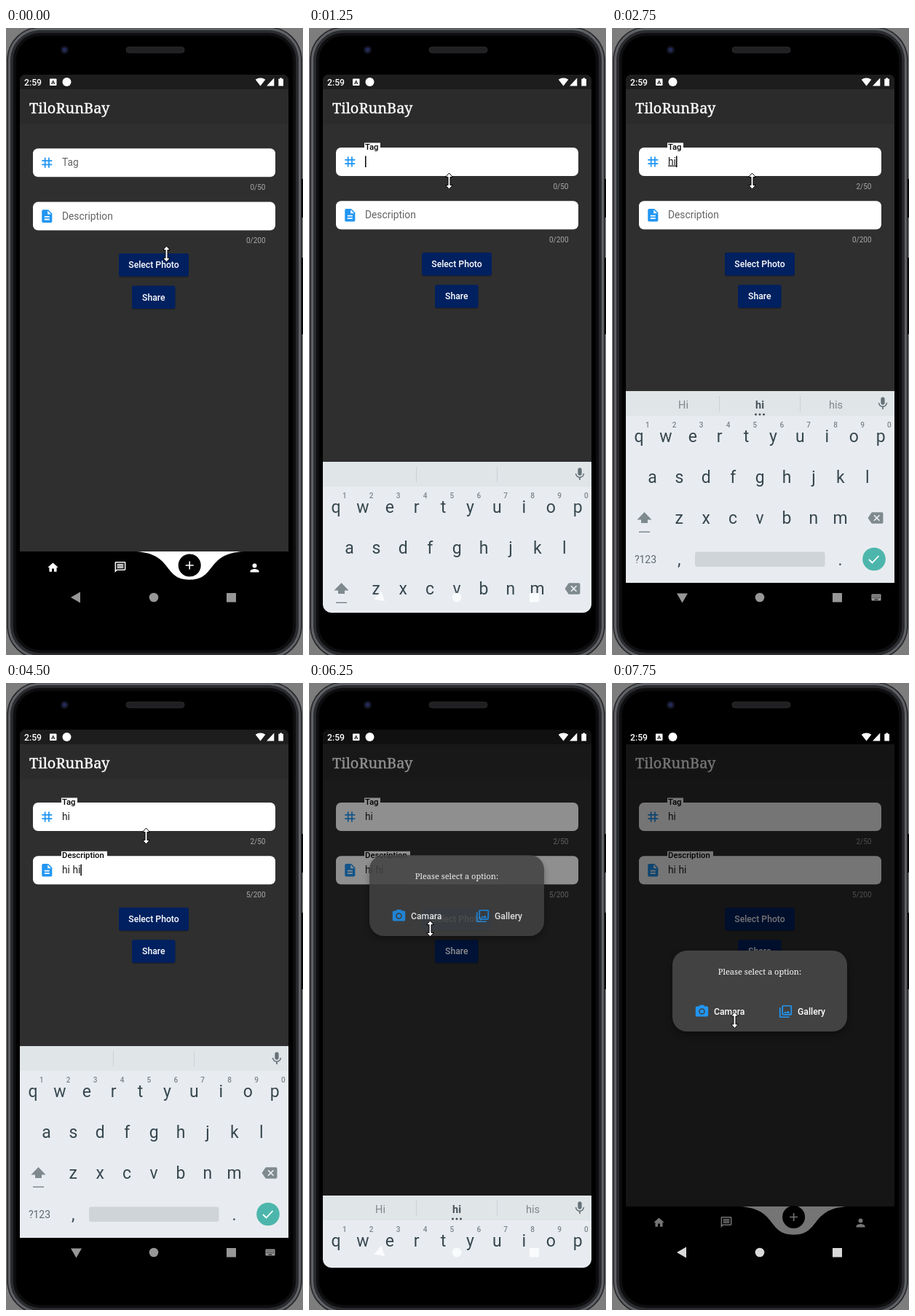
Recreate the animation shown at these times as an HTML page. Size 408 by 860 pixels, loop 8 s.

```html
<!DOCTYPE html>
<html lang="en">
<head>
<meta charset="utf-8">
<title>Share form</title>
<style>
html, body { margin: 0; width: 100%; height: 100%; overflow: hidden; background: #7d7d7d; }
svg { display: block; width: 100%; height: 100%; }
text { font-family: Roboto, Arial, sans-serif; }
.serif { font-family: "Noto Serif", serif; fill: #fff; }
.mid { text-anchor: middle; }
.end { text-anchor: end; }
.bold { font-weight: 500; }
.count { font-size: 10px; fill: #a9a9a9; }
.button { font-size: 12.2px; font-weight: 500; fill: #fff; }
.input { font-size: 13.8px; fill: #222; }
.hint { font-size: 13.8px; fill: #626262; }
.label { font-size: 11.3px; font-weight: 500; fill: #000; }
.key { font-size: 23px; fill: #37474f; }
.digit { font-size: 10px; font-weight: 500; fill: #7b858a; }
.word { font-size: 14.5px; fill: #7d878b; }
#dialog { filter: drop-shadow(0 5px 4px rgba(0, 0, 0, .35)); }
</style>
</head>
<body>
<svg id="stage" viewBox="0 0 408 860" preserveAspectRatio="none"></svg>
<script>
const STEP = 250, LOOP = 8000, KEY_GAP = 36.9;

const icons = {
  home: 'M10 20v-6h4v6h5v-8h3L12 3 2 12h3v8z',
  chat: 'M4 4h16v12H5.2L4 17.2V4m0-2a2 2 0 0 0-2 2v18l4-4h14a2 2 0 0 0 2-2V4a2 2 0 0 0-2-2zM6 12h12v2H6zM6 9h12v2H6zM6 6h12v2H6z',
  person: 'M12 12a4 4 0 1 0 0-8a4 4 0 0 0 0 8zm0 2c-2.7 0-8 1.3-8 4v2h16v-2c0-2.7-5.3-4-8-4z',
  tag: 'M20 10V8h-4V4h-2v4h-4V4H8v4H4v2h4v4H4v2h4v4h2v-4h4v4h2v-4h4v-2h-4v-4zm-6 4h-4v-4h4z',
  file: 'M14 2H6a2 2 0 0 0-2 2v16a2 2 0 0 0 2 2h12a2 2 0 0 0 2-2V8zm2 16H8v-2h8zm0-4H8v-2h8zm-3-5V3.5L18.5 9z',
  mic: 'M12 14a3 3 0 0 0 3-3V5a3 3 0 0 0-6 0v6a3 3 0 0 0 3 3zm5.3-3a5.3 5.1 0 0 1-10.6 0H5c0 3.4 2.7 6.2 6 6.7V21h2v-3.3c3.3-.5 6-3.3 6-6.7z',
  erase: 'M22 3H7a2 2 0 0 0-1.6.9L0 12l5.4 8.1A2 2 0 0 0 7 21h15a2 2 0 0 0 2-2V5a2 2 0 0 0-2-2zm-3 12.6L17.6 17 14 13.4 10.4 17 9 15.6 12.6 12 9 8.4 10.4 7 14 10.6 17.6 7 19 8.4 15.4 12z',
  camera: 'M9 2L7.2 4H4a2 2 0 0 0-2 2v12a2 2 0 0 0 2 2h16a2 2 0 0 0 2-2V6a2 2 0 0 0-2-2h-3.2L15 2zM12 17a5 5 0 1 0 0-10a5 5 0 0 0 0 10zM12 15.2a3.2 3.2 0 1 0 0-6.4a3.2 3.2 0 0 0 0 6.4z',
  gallery: 'M20 4v12H8V4h12m0-2H8a2 2 0 0 0-2 2v12a2 2 0 0 0 2 2h12a2 2 0 0 0 2-2V4a2 2 0 0 0-2-2zm-8.5 9.7l1.7 2.3 2.5-3.1L19 15H9zM2 6v14a2 2 0 0 0 2 2h14v-2H4V6z'
};

const icon = (name, x, y, scale, fill) =>
  `<path d="${icons[name]}" fill="${fill}" fill-rule="evenodd" transform="translate(${x} ${y}) scale(${scale}) translate(-12 -12)"/>`;
const rect = (x, y, w, h, r, fill, more = '') =>
  `<rect x="${x}" y="${y}" width="${w}" height="${h}" rx="${r}" fill="${fill}" ${more}/>`;
const circle = (x, y, r, fill) => `<circle cx="${x}" cy="${y}" r="${r}" fill="${fill}"/>`;
const text = (cls, x, y, content, more = '') =>
  `<text class="${cls}" x="${x}" y="${y}" ${more}>${content}</text>`;

const field = (id, y, name, glyph, labelWidth) => `
  ${rect(37, y, 333, 39, 7, '#fff')}
  ${icon(glyph, 56.3, y + 19.5, .88, '#2196f3')}
  ${text('hint', 77, y + 24, name, `id="${id}Hint"`)}
  <g id="${id}Label">
    ${rect(76, y - 6.5, labelWidth, 11, 0, '#fff')}
    ${text('label', 77, y + 2.5, name)}
  </g>
  ${text('input', 77, y + 23.5, '', `id="${id}Text"`)}
  ${rect(77, y + 11.5, 1.5, 15.5, 0, '#000', `id="${id}Caret"`)}
  ${text('count end', 356.5, y + 56.5, '', `id="${id}Count"`)}`;

const button = (x, y, w, name) =>
  rect(x, y + 1, w, 32, 3, '#000', 'opacity=".25"') + rect(x, y, w, 31.5, 3, '#002060') +
  text('button mid', x + w / 2, y + 20, name);

const keyRow = (keys, x, y) => [...keys].map((k, i) => text('key mid', x + i * KEY_GAP, y, k)).join('');

// A rounded outline of the phone body, inset from the stage sides.
const shell = (inset, fill, stroke, width) =>
  rect(inset, inset - 3, 408 - 2 * inset, 870 - 2 * inset, 47 - inset, fill, `stroke="${stroke}" stroke-width="${width}"`);

const phone = `
  ${rect(0, 0, 408, 860, 0, '#7d7d7d')}
  ${shell(1.5, '#161617', '#3a3b3e', 1)}
  ${shell(4.5, '#161617', '#5f6166', 3.5)}
  ${shell(8, '#0e0e10', '#2b2c2f', 3.5)}
  ${shell(14, '#000', '#050506', 1)}
  ${rect(406, 207, 2, 53, 0, '#080808')}${rect(406, 315, 2, 105, 0, '#080808')}
  ${rect(165, 26, 80, 8, 4, '#202022', 'stroke="#303033" stroke-width=".8"')}
  ${circle(80.5, 30, 5.5, '#11131f')}${circle(80.5, 30, 3, '#232a55')}`;

const page = `
  ${rect(19, 64, 369, 654, 0, '#2f2f2f')}
  ${rect(19, 84, 369, 48, 0, '#2b2b2b')}
  ${rect(19, 64, 369, 20, 0, '#1d1d1d')}
  ${text('serif', 32, 117, 'TiloRunBay', 'font-size="20" stroke="#fff" stroke-width=".4"')}
  <g id="form">
    ${field('tag', 164, 'Tag', 'tag', 22)}
    ${field('desc', 237.3, 'Description', 'file', 63)}
    ${button(155, 308, 96, 'Select Photo')}
    <path id="ripple" d="M155 320a11.5 11.5 0 1 1 0 8z" fill="#fff" opacity=".17"/>
    ${button(173, 352.3, 59.5, 'Share')}
  </g>
  ${rect(19, 718, 369, 84, 0, '#000')}
  <g id="notch"><path d="M-73.8 718C-22 721 -36.9 756.7 0 756.7S22 721 73.8 718z" fill="#fff"/></g>
  <g id="plus">${circle(0, 0, 15.5, '#000')}<path d="M-5.5 0h11M0-5.5v11" stroke="#fff" stroke-width="1.6"/></g>
  ${icon('home', 64.5, 740, .72, '#fff')}
  ${icon('chat', 157, 739.5, .74, '#fff')}
  ${icon('person', 341.5, 740.5, .75, '#fff')}`;

const dialog = `
  <g id="dialog">
    ${rect(83, 367, 240, 111, 20, '#424242')}
    ${text('serif mid', 203, 399.5, 'Please select a option:', 'font-size="11"')}
    ${icon('camera', 123.5, 450.5, .87, '#2196f3')}
    ${text('button', 140, 455, 'Camara')}
    ${icon('gallery', 238.5, 450.5, .86, '#2196f3')}
    ${text('button', 255, 455, 'Gallery')}
  </g>`;

const keyboard = `
  <g id="keyboard">
    ${rect(19, 498, 369, 263, 0, '#e8ecf0')}
    ${rect(19, 498, 369, 34, 0, '#e0e5e8')}
    ${rect(147, 505, 1, 21, 0, '#cbd1d4')}${rect(258, 505, 1, 21, 0, '#cbd1d4')}
    ${icon('mic', 372, 515, .88, '#667278')}
    <g id="words">
      ${text('word mid', 98, 521.5, 'Hi')}
      ${text('word mid', 203, 521.5, 'hi', 'style="font-weight:700;fill:#455158"')}
      ${text('word mid', 307.5, 521.5, 'his')}
      ${[197.5, 203, 208.5].map(x => circle(x, 530, 1.5, '#455158')).join('')}
    </g>
    ${keyRow('qwertyuiop', 37, 567.5)}
    ${[...'1234567890'].map((d, i) => text('digit mid', 48.8 + i * KEY_GAP, 548, d)).join('')}
    ${keyRow('asdfghjkl', 55.5, 623.5)}
    ${keyRow('zxcvbnm', 92.3, 680)}
    <path d="M44.5 664l10 10.5h-5.5v4.5h-9v-4.5h-5.5z" fill="#7f8a8e"/>
    ${rect(37, 690.5, 15, 1.5, 0, '#7f8a8e')}
    ${icon('erase', 362, 672, .87, '#7f8a8e')}
    ${text('mid', 46, 733.5, '?123', 'font-size="14" fill="#5d696f"')}
    ${text('key mid', 92.3, 737, ',')}${text('key mid', 313.5, 737, '.')}
    ${rect(114, 718.5, 178.5, 20.5, 3, '#cfd4d8')}
    ${circle(360, 728.5, 15.8, '#4db6ac')}
    <path d="M353 729l4.5 4.5 9-9.5" fill="none" stroke="#fff" stroke-width="1.8"/>
  </g>`;

const systemBar = `
  <g id="bar">
    <path id="back" d="M-7.5 0L5.5-7.5V7.5z"/>
    <circle cx="203" cy="781" r="6.3"/>
    <rect x="303" y="775" width="13" height="12.5"/>
    <g id="switcher">
      <rect x="356.5" y="776.5" width="13" height="9" rx="1"/>
      <path d="M358 779h10M358 781.5h10" stroke="#000" stroke-dasharray="1.2 1"/>
      <path d="M360.5 784h5" stroke="#000"/>
    </g>
  </g>`;

const statusBar = `
  ${rect(19, 64, 369, 20, 0, '#000', 'id="statusShade"')}
  ${text('bold', 25, 78.5, '2:59', 'font-size="12.2" fill="#fff"')}
  ${rect(60, 69.5, 9.5, 9.5, 1, '#fff')}
  ${text('mid', 64.75, 77.2, 'A', 'font-size="8" font-weight="700" fill="#1d1d1d"')}
  ${circle(83.5, 74, 6, '#fff')}
  <path d="M349.5 79.5l-6.8-8.7a11 11 0 0 1 13.6 0zM358 79.5h10.3V68.5z" fill="#fff"/>
  <path d="M374.3 69.8h2V68.5h2.7v1.3h2v9.7h-6.7z" fill="#fff"/>`;

document.getElementById('stage').innerHTML = `
  <defs><clipPath id="screen"><path d="M27 64H380a8 8 0 0 1 8 8V790a12 12 0 0 1-12 12H31a12 12 0 0 1-12-12V72a8 8 0 0 1 8-8z"/></clipPath></defs>
  ${phone}
  <g clip-path="url(#screen)">
    ${page}
    ${rect(19, 64, 369, 738, 0, '#000', 'id="scrim"')}
    ${dialog}${keyboard}${systemBar}${statusBar}
  </g>
  <path id="pointer" d="M0-11L5-5.5H1.5V5.5H5L0 11L-5 5.5H-1.5V-5.5H-5z" fill="#fff" stroke="#000"/>`;

// Each entry changes the state from its time on; keys is the keyboard offset, null when hidden.
const timeline = [
  [0, { pointer: [220.5, 310], shift: 1.3, notch: 252.2, plus: 737, keys: null, focus: '', caret: true,
        tag: '', desc: '', compose: 0, words: false, ripple: false, scrim: 0, dialog: 0, rise: 0, shade: false }],
  [250, { shift: 0, notch: 249.6, plus: 732.5, pointer: [212, 272] }],
  [500, { pointer: [196, 216] }],
  [750, { pointer: [192.5, 210] }],
  [1250, { focus: 'tag', keys: 97 }],
  [1500, { keys: 0 }],
  [1750, { caret: false }],
  [2250, { caret: true }],
  [2500, { tag: 'h', compose: 1 }],
  [2750, { tag: 'hi', compose: 2, words: true }],
  [3500, { caret: false }],
  [4000, { focus: 'desc', caret: true, compose: 0, words: false }],
  [4250, { desc: 'hi', compose: 2 }],
  [4500, { desc: 'hi hi', compose: 0 }],
  [4750, { compose: 2, words: true }],
  [5250, { pointer: [186, 240], caret: false }],
  [5500, { pointer: [170, 318] }],
  [5750, { pointer: [166.5, 337], caret: true }],
  [6000, { ripple: true }],
  [6250, { focus: '', ripple: false, keys: 205, scrim: .44, dialog: .86, rise: -131 }],
  [6500, { keys: null, words: false, scrim: .54, dialog: 1, rise: 0, shade: true }],
  [7000, { pointer: [166.5, 385] }],
  [7250, { pointer: [167, 440] }],
  [7500, { pointer: [167, 466] }],
  [7750, { pointer: [168.5, 462.5] }]
];

const $ = id => document.getElementById(id);
const show = (id, on) => $(id).style.display = on ? '' : 'none';
const move = (id, x, y, more = '') => $(id).setAttribute('transform', `translate(${x} ${y}) ${more}`);

function drawField(id, s, limit) {
  const value = s[id], focused = s.focus === id;
  const split = value.length - (focused ? s.compose : 0);
  const floating = focused || value !== '';
  show(id + 'Hint', !floating);
  show(id + 'Label', floating);
  $(id + 'Text').innerHTML = `${value.slice(0, split)}<tspan text-decoration="underline">${value.slice(split)}</tspan>`;
  $(id + 'Count').textContent = `${value.length}/${limit}`;
  show(id + 'Caret', focused && s.caret);
  const width = value ? $(id + 'Text').getComputedTextLength() : 0;
  $(id + 'Caret').setAttribute('x', 77 + width);
}

function draw(time) {
  const s = Object.assign({}, ...timeline.filter(([at]) => at <= time).map(([, change]) => change));
  const open = s.keys === 0, sliding = s.keys > 0;
  move('pointer', ...s.pointer);
  move('form', 0, s.shift);
  move('notch', s.notch, 0);
  move('plus', s.notch, s.plus);
  drawField('tag', s, 50);
  drawField('desc', s, 200);
  show('ripple', s.ripple);
  show('statusShade', s.shade);
  $('scrim').setAttribute('opacity', s.scrim);
  $('dialog').setAttribute('opacity', s.dialog);
  move('dialog', 0, s.rise);
  show('keyboard', s.keys !== null);
  move('keyboard', 0, s.keys || 0);
  show('words', s.words);
  show('switcher', open);
  $('bar').setAttribute('fill', sliding ? '#fafbfc' : s.scrim ? '#d9d9d9' : '#979797');
  move('back', 96.5, 781, `rotate(${open ? -90 : sliding ? -20 : 0})`);
}

const start = performance.now();
let shown = -1;
function tick() {
  const time = Math.floor((performance.now() - start) % LOOP / STEP) * STEP;
  if (time !== shown) draw(shown = time);
  requestAnimationFrame(tick);
}
tick();
</script>
</body>
</html>
```
